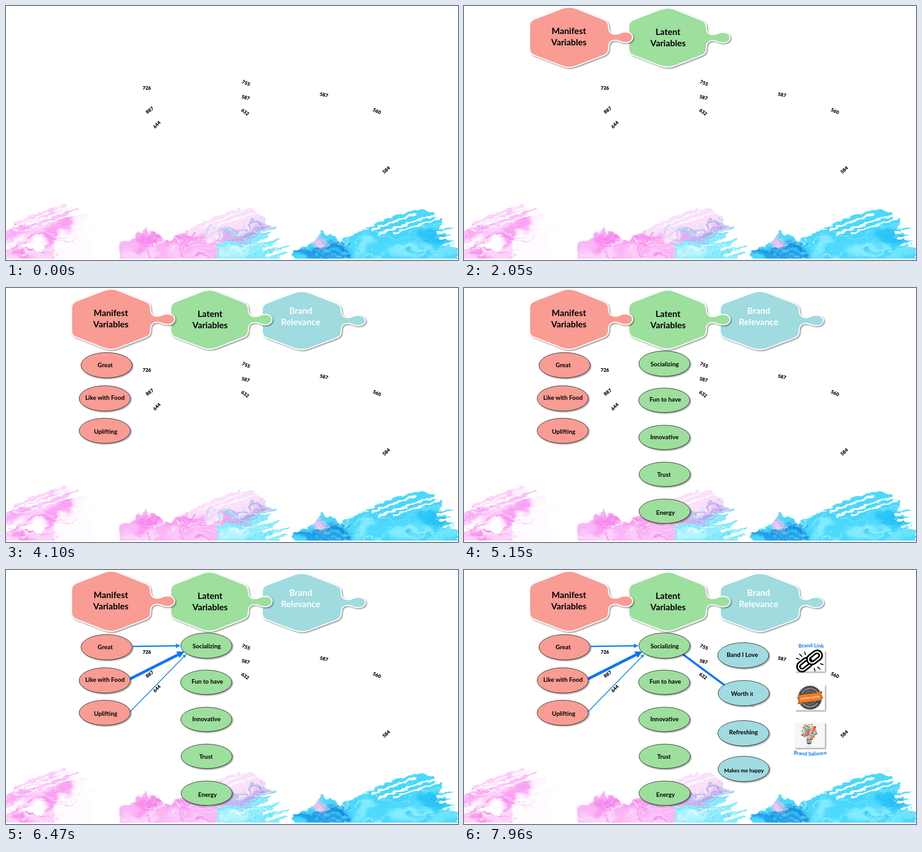
An HTML page that plays this animation: 998x561 px, repeating every 8 s.

```html
<!DOCTYPE html>
<html lang="en">
<head>
<meta charset="utf-8">
<title>Variables diagram</title>
<style>
  html, body { margin: 0; width: 100%; height: 100%; overflow: hidden; background: #fff; }
  svg { position: absolute; left: 0; top: 0; width: 998px; height: 561px; }
  text { font-family: Lato, sans-serif; font-weight: 700; text-anchor: middle; }
  .shadow { filter: drop-shadow(2.5px 2.5px 1.5px rgba(0, 0, 0, .42)); }
  .value { font-weight: 900; font-size: 10.6px; }
</style>
</head>
<body>
<svg id="paint" viewBox="0 0 998 561"></svg>
<svg id="diagram" viewBox="0 0 998 561"></svg>
<script>
const LOOP = 8000;
const RED = '#f99c93', GREEN = '#9ddf9d', TEAL = '#9fdbdf', BLUE = '#0a75ff';

let seed = 77;
const rand = (lo = 0, hi = 1) => {
  seed = seed * 16807 % 2147483647;
  return lo + (hi - lo) * seed / 2147483647;
};
const pick = list => list[Math.floor(rand(0, list.length))];
const repeat = (n, make) => Array.from({ length: n }, (_, i) => make(i)).join('');

// ---- Marbled paint along the bottom ----
const swirls = (n, x, y, w, h, colors, maxWidth) => repeat(n, () => {
  const dx = rand(12, 45), dy = rand(-26, 18);
  return `<path d="M${rand(x, x + w)} ${rand(y, y + h)}q${dx * .3} ${dy} ${dx} ${dy * .6}t${dx * .7} ${rand(-20, 15)}"
    fill="none" stroke="${pick(colors)}" stroke-width="${rand(.5, maxWidth)}" stroke-linecap="round" opacity="${rand(.3, .85)}"/>`;
});
const blob = (x, y, rx, ry, color, turn = 0, opacity = 1) =>
  `<ellipse cx="${x}" cy="${y}" rx="${rx}" ry="${ry}" fill="${color}" opacity="${opacity}" transform="rotate(${turn} ${x} ${y})"/>`;
const slab = (x, w, color) => `<rect x="${x}" y="425" width="${w}" height="160" fill="${color}"/>`;
const streak = (x1, y1, x2, y2, w) =>
  `<path d="M${x1} ${y1}L${x2} ${y2}" stroke="#fff" stroke-width="${w}" stroke-linecap="round"/>`;

const leftShape = 'M-20 496L5 495 16 490 20 478 45 468 85 452 128 437 132 441 104 454 160 443 163 447 130 462 178 459 180 466 170 482 207 480 208 489 180 492 200 580H-20Z';
const midShape = 'M250 523L270 519 286 509 290 497 300 502 310 490 314 504 327 496 340 506 348 516 364 518 376 507 402 496 430 480 462 466 520 444 518 452 548 448 558 462 571 466 574 484 599 488 582 502 578 512 608 514 588 527 626 529 603 540 622 545 604 552 611 580H250Z';
const rightShape = 'M630 545L652 533 668 531 664 524 678 526 685 512 700 497 704 506 720 506 737 521 752 511 795 492 820 480 850 467 880 457 915 449 946 457 938 466 962 469 965 480 956 492 990 489 968 502 998 508 972 514 996 522 978 530 998 536V580H650Z';

const marbleNoise = '<feTurbulence type="fractalNoise" baseFrequency=".018 .024" numOctaves="2" seed="8" result="n"/>';
const displace = (source, scale) =>
  `<feDisplacementMap in="${source}" in2="n" scale="${scale}" xChannelSelector="R" yChannelSelector="G"/>`;

paint.innerHTML = `
  <defs>
    <filter id="marble" x="-5%" y="-10%" width="110%" height="120%" color-interpolation-filters="sRGB">
      ${marbleNoise}${displace('SourceGraphic', 48)}
    </filter>
    <filter id="soft" x="-5%" y="-10%" width="110%" height="120%" color-interpolation-filters="sRGB">
      <feGaussianBlur in="SourceGraphic" stdDeviation="3.5" result="b"/>
      ${marbleNoise}${displace('b', 48)}
    </filter>
    <filter id="rough" filterUnits="userSpaceOnUse" x="-20" y="420" width="1040" height="170" color-interpolation-filters="sRGB">
      <feTurbulence type="fractalNoise" baseFrequency=".07 .12" numOctaves="3" seed="4" result="n"/>
      ${displace('SourceGraphic', 10)}
    </filter>
    <clipPath id="strokes"><path d="${leftShape}${midShape}${rightShape}"/></clipPath>
    <clipPath id="page"><rect width="998" height="558"/></clipPath>
  </defs>
  <g clip-path="url(#page)"><g filter="url(#rough)">
    <g clip-path="url(#strokes)">
      ${slab(-20, 126, '#fdd2fa')}${slab(106, 130, '#fffaff')}${slab(250, 217, '#fab6f6')}
      ${slab(467, 150, '#84ecfc')}${slab(617, 400, '#4cd9fc')}
      <path d="M400 440H610V486L540 500 467 526 400 505Z" fill="#fce0fa"/>
      <g filter="url(#soft)">
        ${blob(15, 520, 26, 13, '#fff', -40)}${blob(38, 490, 42, 11, '#fbaaf6', -25)}
        ${blob(115, 492, 60, 13, '#faa2f5', -38)}${blob(55, 528, 32, 10, '#fff', -30)}
        ${blob(135, 455, 45, 10, '#fcc0f8', -18)}${blob(152, 520, 45, 34, '#fffcff')}
        ${blob(30, 552, 28, 7, '#f794ec', 10)}
        ${blob(315, 515, 42, 16, '#f88bee', -10)}${blob(290, 548, 45, 8, '#fdd8fb', -15)}
        ${blob(400, 522, 45, 12, '#f996f0', -15)}${blob(400, 550, 50, 8, '#fccdfa')}
        ${blob(520, 503, 62, 7, '#dba6ee', -18)}${blob(548, 498, 42, 4, '#9cc3f0', -20)}
        ${blob(500, 540, 35, 10, '#b8f4fd', -20)}
        ${blob(690, 546, 55, 14, '#1fa2e8', -5)}${blob(740, 532, 26, 8, '#168bdc', 40)}
        ${blob(701, 524, 19, 14, '#f2c2ee', 15)}${blob(690, 508, 10, 7, '#dcc6f2')}
        ${blob(800, 528, 35, 12, '#84ebfe', -30)}${blob(850, 500, 50, 11, '#48d4fb', -20)}
        ${blob(940, 510, 25, 20, '#28c2f6', 20)}${blob(890, 540, 45, 12, '#84ecfe', -15)}
        ${blob(965, 545, 35, 11, '#6ce4fc', -20)}
      </g>
      <g filter="url(#marble)">
        ${swirls(26, -10, 480, 90, 75, ['#f684ea', '#fff', '#f06fe0', '#feeafd'], 3)}
        ${swirls(9, 100, 475, 45, 70, ['#fcdffa', '#fff'], 2)}
        ${swirls(34, 245, 500, 175, 58, ['#f176e2', '#fff', '#fbd0f9', '#e785e6'], 2.6)}
        ${swirls(24, 440, 492, 105, 26, ['#9a92de', '#fff', '#f28de6', '#8ad8f5', '#cb8ee5'], 2.5)}
        ${swirls(18, 468, 525, 100, 35, ['#fff', '#46d8f8', '#c2f6fe'], 2.5)}
        ${swirls(26, 635, 515, 100, 45, ['#0f7cd0', '#52d2f9', '#d8f0fd', '#1ea2ea'], 3)}
        ${swirls(44, 750, 470, 225, 88, ['#98edfe', '#28bef5', '#3ccff9', '#c0f5fe'], 2.6)}
        ${repeat(12, () => blob(rand(340, 465), rand(515, 552), rand(.6, 2.4), rand(.6, 2), pick(['#fff', '#a8def5'])))}
      </g>
    </g>
    ${streak(20, 487, 90, 458, 4)}${streak(45, 483, 152, 446, 5)}${streak(82, 482, 168, 453, 4)}
    ${streak(150, 488, 215, 482, 8)}${streak(428, 489, 522, 453, 2.5)}${streak(455, 488, 562, 453, 3)}
    ${streak(566, 500, 612, 492, 5)}${streak(560, 521, 614, 506, 6)}${streak(570, 538, 634, 520, 7)}
    ${streak(577, 551, 632, 535, 6)}${streak(808, 494, 905, 458, 4)}${streak(826, 502, 950, 460, 5)}
    ${streak(855, 502, 956, 469, 4)}${streak(952, 500, 1002, 492, 6)}${streak(960, 514, 1004, 505, 5)}
    ${streak(968, 527, 1004, 520, 4)}
  </g><rect x="234" y="505" width="16" height="60" fill="#fff"/></g>`;

// ---- Diagram ----
const label = (x, y, s, size = 13.4, extra = '') => `<text x="${x}" y="${y}" font-size="${size}" ${extra}>${s}</text>`;
const hexPath = 'M146 44Q146 34 156 30L217 6.5Q232 1 247 6.5L308 31Q318 35 318 46C318 58 324 63.5 334 63.5C344 63.5 345 58.5 357 58.5C376 58.5 376 79.5 357 79.5C345 79.5 344 74.5 334 74.5C324 74.5 318 80 318 92V94Q318 104 308 108L247 131.5Q232 137 217 131.5L156 108Q146 104 146 94Z';
const hexagon = (at, x, y, sx, sy, fill, lines, tx, ty, ink = '#000') => `
  <g data-at="${at}"><path class="shadow" d="${hexPath}" transform="translate(${x} ${y}) scale(${sx} ${sy}) translate(-146 0)"
    fill="${fill}" stroke="#fff" stroke-width="5" paint-order="stroke"/>
  ${lines.map((s, i) => label(tx, ty + 25 * i, s, 19.3, `fill="${ink}"`)).join('')}</g>`;
const oval = (x, y, ry, fill, s, tx, ty, size) => `
  <ellipse class="shadow" cx="${x}" cy="${y}" rx="56.5" ry="${ry}" fill="${fill}" stroke="#222" stroke-width="1"/>
  ${label(tx, ty, s, size)}`;
const value = (n, x, y, turn) => `<text class="value" dy=".36em" transform="translate(${x} ${y}) rotate(${turn})">${n}</text>`;

// Each arrow is uncovered along one axis by a soft-edged gradient.
const arrows = [
  { start: 5150, span: 480, axis: 'y', from: 246, to: 176, edge: 12, line: [273, 241, 394, 180], width: 6, head: 16, color: BLUE },
  { start: 5630, span: 480, axis: 'y', from: 314, to: 185, edge: 20, line: [274, 313, 398, 186], width: 2, head: 8, color: '#2c90ee' },
  { start: 6230, span: 240, axis: 'y', from: 173, to: 162, edge: 3, line: [280, 168.7, 385, 167.3], width: 3, head: 10, color: '#0a84ff' },
  { start: 7640, span: 480, axis: 'x', from: 483, to: 703, edge: 20, line: [483, 186, 730, 369], width: 4.6, head: 14, color: BLUE },
];
const drawArrow = ({ start, line: [x1, y1, x2, y2], width, head, color, axis, from, to, edge }, i) => {
  const len = Math.hypot(x2 - x1, y2 - y1), ux = (x2 - x1) / len, uy = (y2 - y1) / len;
  const bx = x2 - ux * head, by = y2 - uy * head, h = head / 2;
  const back = from - Math.sign(to - from) * edge;
  const ends = axis === 'x' ? `x1="${back}" x2="${from}" y1="0" y2="0"` : `x1="0" x2="0" y1="${back}" y2="${from}"`;
  return `<linearGradient id="wipe${i}" gradientUnits="userSpaceOnUse" ${ends}>
      <stop stop-color="${color}"/><stop offset="1" stop-color="${color}" stop-opacity="0"/></linearGradient>
    <g data-at="${start}"><path d="M${x1} ${y1}L${bx} ${by}" stroke="url(#wipe${i})" stroke-width="${width}"/>
    <path d="M${x2} ${y2}L${bx - uy * h} ${by + ux * h} ${bx + uy * h} ${by - ux * h}Z" fill="url(#wipe${i})"/></g>`;
};

const card = (x, y, w, h, fill = '#fff') => `<rect class="shadow" x="${x}" y="${y}" width="${w}" height="${h}" fill="${fill}"/>`;
const ring = (x, y, ink, width) =>
  `<rect x="${x - 15}" y="${y - 8}" width="30" height="16" rx="8" fill="none" stroke="${ink}" stroke-width="${width}" transform="rotate(-38 ${x} ${y})"/>`;
const link = (x, y) => ring(x, y, '#000', 10) + ring(x, y, '#fff', 3);
const spark = (x, y, dx, dy) => `<path d="M${x} ${y}l${dx} ${dy}" stroke="#000" stroke-width="2" stroke-linecap="round"/>`;
const curved = (id, d, s, size, ink) => `<path id="${id}" d="${d}" fill="none"/>
  <text font-size="${size}" fill="${ink}"><textPath href="#${id}" startOffset="50%">${s}</textPath></text>`;

const chain = card(731, 178, 66, 46.5) + link(752, 209) + link(774, 193) +
  spark(741, 186, 5, 5) + spark(752, 181, 2, 6) + spark(734, 195, 6, 2) +
  spark(781, 214, 5, 5) + spark(773, 217, 2, 6) + spark(787, 207, 6, 2);

const cog = Array.from({ length: 72 }, (_, i) => {
  const a = i * Math.PI / 36, r = i % 2 ? 25 : 27.5;
  return `${764 + r * Math.cos(a)} ${282 + r * Math.sin(a)}`;
}).join('L');
const badge = card(731, 254, 66, 56) + `
  <path d="M${cog}Z" fill="#444"/>
  <circle cx="764" cy="282" r="15" fill="#555" stroke="#bbb" stroke-width=".7"/>
  ${curved('arcTop', 'M745.5 282a18.5 18.5 0 0 1 37 0', 'DIFFERENTIATION', 4.6, '#eee')}
  ${curved('arcLow', 'M742 282a22 22 0 0 0 44 0', 'DIFFERENTIATION', 4.6, '#eee')}
  <g transform="rotate(-7 764 282)"><path d="M735 277h10v16h-10l4-8zM793 271h-10v16h10l-4-8z" fill="#c95a10"/>
  <rect x="740" y="273.5" width="48" height="17" fill="#f47b20"/>${label(764, 284, 'DIFFERENTIATION', 4.9, 'fill="#fff"')}</g>`;

const confetti = ['#e8503a', '#2f9ec4', '#f5a623', '#58b7a8', '#e4664f', '#8fa6b2'];
const bulb = card(730, 337, 67, 56, '#f6f6f6') +
  repeat(46, i => {
    const a = i * 2.4, r = 2.5 * Math.sqrt(i), size = rand(1.4, 3);
    return blob(762 + r * Math.cos(a), 357 + r * Math.sin(a), size, size, pick(confetti));
  }) + `<path d="M756 374h12v2h-12zM756 377.5h12v2h-12zM756 381h12l-3 4h-6z" fill="#56616b"/>` +
  label(762, 389.5, 'innovation', 2.6, 'fill="#888"');

diagram.innerHTML = `
  ${hexagon(3100, 567, 5, 1, .967, TEAL, ['Brand', 'Relevance'], 650.5, 57, '#fff')}
  ${hexagon(2050, 365, 2, .982, .982, GREEN, ['Latent', 'Variables'], 450.5, 64)}
  ${hexagon(1050, 146, 0, 1, 1, RED, ['Manifest', 'Variables'], 231.5, 62)}
  ${arrows.map(drawArrow).join('')}
  <g data-at="4100">
    ${oval(222, 170.5, 28, RED, 'Great', 219, 175)}
    ${oval(218, 243.8, 28, RED, 'Like with Food', 218.5, 246.5)}
    ${oval(218, 315.3, 27.7, RED, 'Uplifting', 220, 322)}
  </g>
  <g data-at="5150">
    ${oval(442.5, 167, 28, GREEN, 'Socializing', 443, 173)}
    ${oval(442, 248, 27, GREEN, 'Fun to have', 444.5, 250.5)}
    ${oval(442.3, 330, 27, GREEN, 'Innovative', 442.5, 334)}
    ${oval(443, 411.5, 27, GREEN, 'Trust', 441.5, 417)}
    ${oval(443, 493, 27, GREEN, 'Energy', 445, 500.5)}
  </g>
  <g data-at="7640">
    ${oval(616.5, 188.5, 28, TEAL, 'Band I Love', 614.5, 191.5)}
    ${oval(617.5, 272, 28, TEAL, 'Worth <tspan font-size="11.7">it</tspan>', 614, 278)}
    ${oval(617, 360.5, 28, TEAL, 'Refreshing', 617, 363)}
    ${oval(617.5, 439.3, 28, TEAL, 'Makes me happy', 618, 447, 11.7)}
    ${chain}${badge}${bulb}
    ${curved('arcLink', 'M736 172.5Q766.5 168.5 797 172.5', 'Brand Link', 11.6, BLUE)}
    ${curved('arcSalience', 'M723 406Q764.5 414 806 406', 'Brand Salience', 11.3, BLUE)}
  </g>
  ${value(726, 311, 181, 0)}${value(887, 317, 230, -35)}${value(644, 333, 262, -46)}
  ${value(755, 530, 170, 22)}${value(587, 529, 202, 14)}${value(632, 528, 234, 36)}
  ${value(587, 702, 196, 13)}${value(560, 819, 232, 25)}${value(584, 839.5, 362, -42)}`;

const layers = [...diagram.querySelectorAll('[data-at]')];
const wipes = arrows.map((_, i) => document.getElementById('wipe' + i));
const origin = performance.now();

function frame() {
  const t = (performance.now() - origin) % LOOP;
  for (const layer of layers) layer.style.display = t >= +layer.dataset.at ? '' : 'none';
  arrows.forEach(({ start, span, axis, from, to, edge }, i) => {
    const p = Math.min(1, Math.max(0, Math.floor((t - start) / 40) * 40 / span));
    const shift = p * (to - from + Math.sign(to - from) * edge);
    wipes[i].setAttribute('gradientTransform', axis === 'x' ? `translate(${shift} 0)` : `translate(0 ${shift})`);
  });
  requestAnimationFrame(frame);
}
frame();
</script>
</body>
</html>
```
